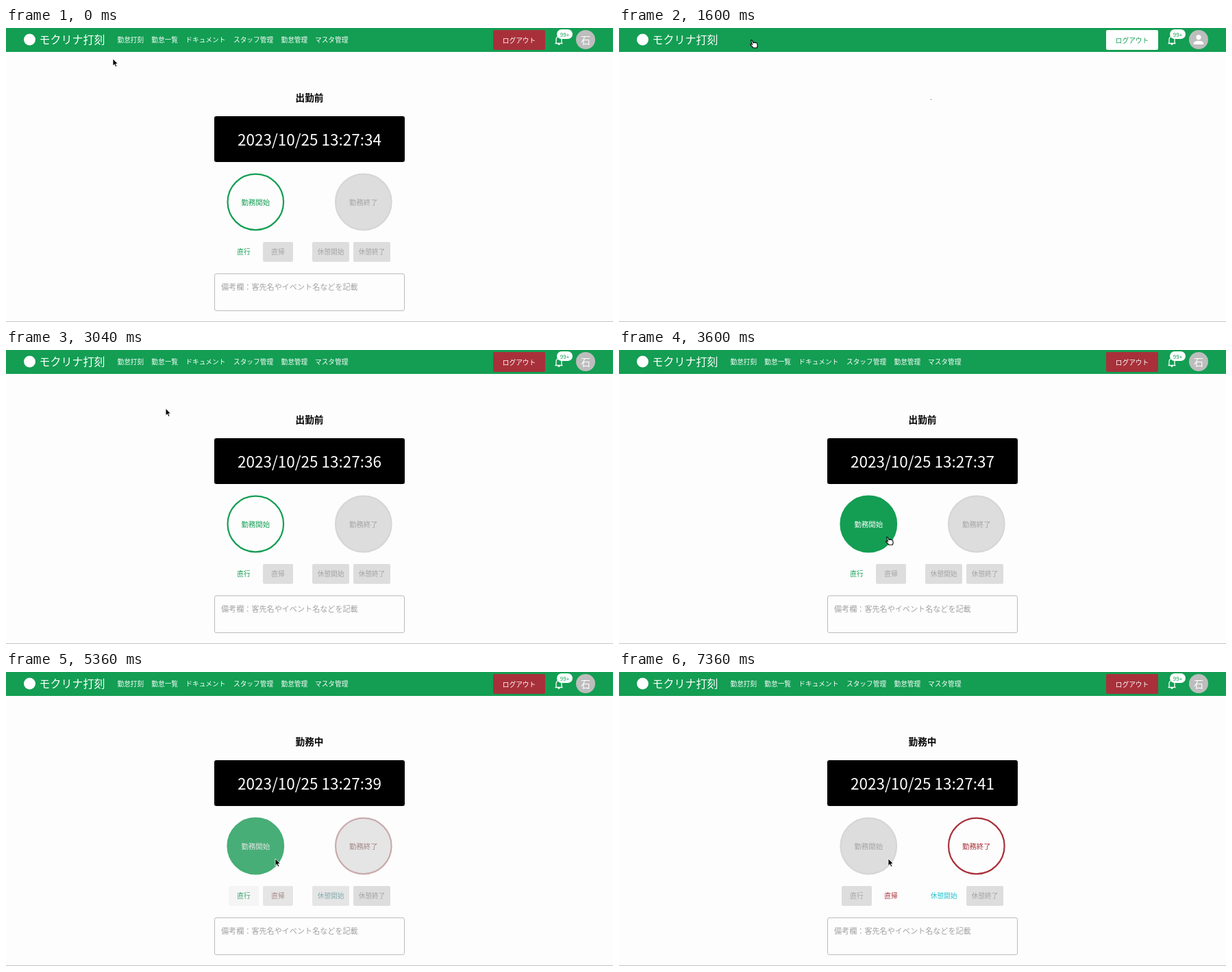
These frames come from a looping animation (886 px wide and 430 px high, 7.6 s). An HTML page:

```html
<!DOCTYPE html>
<html lang="ja">
<head>
<meta charset="utf-8">
<title>打刻画面</title>
<style>
html, body { margin: 0; width: 100%; height: 100%; overflow: hidden; background: #fdfdfd; }
svg { display: block; font: 500 9.7px "Noto Sans CJK JP", "Noto Sans CJK", sans-serif; }
.mid { text-anchor: middle; }
</style>
</head>
<body>
<svg width="886" height="430" viewBox="0 0 886 430">
  <rect width="886" height="35" fill="#139e53"/>
  <rect y="429" width="886" height="1" fill="#c4c4c4"/>
  <circle cx="34.5" cy="17" r="8.5" fill="#fff"/>
  <text x="48.5" y="23" font-size="16" fill="#fff">モクリナ打刻</text>
  <g id="nav" fill="#fff"></g>
  <rect id="logoutBox" x="711" y="3" width="76" height="29" rx="2"/>
  <text id="logout" class="mid" x="749" y="21.5">ログアウト</text>
  <path d="M801.5 22.5h11M803 22v-5q0-4 4-4.3q4 .3 4 4.300v5M805.700 24h2.600" fill="none" stroke="#fff" stroke-width="1.300"/>
  <rect x="804" y="2" width="23" height="14" rx="7" fill="#fff"/>
  <text class="mid" x="815.5" y="12.500" font-size="8" font-weight="400" fill="#139e53">99+</text>
  <circle cx="846" cy="17" r="14" fill="#bdbdbd"/>
  <text id="initial" class="mid" x="846" y="22.500" font-size="14" font-weight="400" fill="#fff">石</text>
  <path id="person" fill="#fff" d="M846 10a3.600 3.600 0 0 1 0 7.200a3.600 3.600 0 0 1 0-7.200M838.800 24v-1.800q0-3.300 7.200-3.500q7.200.2 7.200 3.500V24z"/>
  <g id="form">
    <text id="status" class="mid" x="443" y="107" font-size="13.6" font-weight="700"></text>
    <rect x="304" y="129" width="278" height="67" rx="3"/>
    <text id="clock" class="mid" x="443" y="172" font-size="22.5" font-weight="400" fill="#fff"></text>
    <g id="buttons"></g>
    <rect x="304.500" y="359.500" width="277" height="54" rx="2.500" fill="none" stroke="#bcbcbc"/>
    <text x="314" y="383" font-size="11.1" font-weight="400" fill="#a2a2a2">備考欄：客先名やイベント名などを記載</text>
  </g>
  <circle id="spinner" cx="443.3" cy="104.300" r="12.3" fill="none" stroke="#139e53" stroke-width="2.200" pathLength="126.920"/>
  <g id="cursor">
    <path id="arrow" d="M0 0V10.300L2.400 8.200L4 11.900L5.800 11.100L4.200 7.500H7.300Z" stroke="#fff" stroke-width=".8"/>
    <path id="hand" d="M-2.500 1.200Q-2 0-.8 1L1 4.600Q1.800 3.500 2.800 4.500Q3.800 3.700 4.700 4.800Q6.200 4.300 6.700 6L7.200 9L6.300 12H1L-3.300 7.500Q-3.300 6-1.500 6.600L-.6 7.200Z" fill="#fff" stroke="#000" stroke-width="1.100"/>
  </g>
</svg>
<script>
const LOOP = 7600, STEP = 80;
const GREEN = [19, 158, 83], RED = [168, 48, 58], CYAN = [34, 195, 205];
const PAPER = [253, 253, 253], WHITE = [255, 255, 255];
const GREY = [221, 221, 221], RIM = [214, 214, 214], FAINT = [164, 164, 164];
const TICKS = [960, 2400, 3120, 4000, 5040, 6000, 7040];
const LEAVE = 1440, SPIN = 1600, LOGIN = 1760, LOADED = 2400, HOVER = 3270, STARTED = 5295;

const $ = id => document.getElementById(id);
const clamp = v => Math.max(0, Math.min(1, v));
const span = (t, from, to) => clamp((t - from) / (to - from));
const show = (id, on) => $(id).setAttribute('visibility', on ? 'inherit' : 'hidden');
const mix = (a, b, p) => a.map((v, i) => v + (b[i] - v) * p);
const rgb = c => `rgb(${c.map(Math.round)})`;

// CSS cubic-bezier(x1, 0, x2, 1)
function bezier(x, x1, x2) {
  let lo = 0, hi = 1, u = .5;
  for (let i = 0; i < 24; i++) {
    u = (lo + hi) / 2;
    if (3 * u * (1 - u) ** 2 * x1 + 3 * u * u * (1 - u) * x2 + u ** 3 < x) lo = u; else hi = u;
  }
  return u * u * (3 - 2 * u);
}
const fade = (t, start) => bezier(span(t, start, start + 250), .4, .2);
const inOutCubic = s => s < .5 ? 4 * s ** 3 : 1 - 4 * (1 - s) ** 3;

function add(parent, tag, attrs, text = '') {
  const el = document.createElementNS('http://www.w3.org/2000/svg', tag);
  for (const key in attrs) el.setAttribute(key, attrs[key]);
  el.textContent = text;
  return $(parent).appendChild(el);
}

[['勤怠打刻', 162.5], ['勤怠一覧', 212.3], ['ドキュメント', 262.3],
 ['スタッフ管理', 332], ['勤怠管理', 401.5], ['マスタ管理', 451]]
  .forEach(([label, x]) => add('nav', 'text', { x, y: 21 }, label));

function button(label, x, y, tag, attrs, size) {
  const box = add('buttons', tag, attrs);
  const text = add('buttons', 'text', { x, y, class: 'mid', 'font-size': size }, label);
  return (fill, stroke, color) => {
    box.setAttribute('fill', rgb(fill));
    box.setAttribute('stroke', rgb(stroke));
    text.setAttribute('fill', rgb(color));
  };
}
const round = (label, cx) =>
  button(label, cx, 258.7, 'circle', { cx, cy: 254.5, r: 40.8, 'stroke-width': 2.2 }, 10.4);
const small = (label, x, width) =>
  button(label, x + width / 2, 331.3, 'rect', { x, y: 313, width, height: 29, rx: 2, 'stroke-width': 0 }, 9.7);

const start = round('勤務開始', 364.3), finish = round('勤務終了', 521.8);
const direct = small('直行', 325, 44), home = small('直帰', 375, 44);
const rest = small('休憩開始', 447, 54), resume = small('休憩終了', 507, 54);

function drawButtons(t) {
  const hover = fade(t, HOVER), done = fade(t, STARTED);
  start(mix(mix(PAPER, GREEN, hover), GREY, done), mix(GREEN, RIM, done),
    mix(mix(GREEN, WHITE, hover), FAINT, done));
  finish(mix(GREY, PAPER, done), mix(RIM, RED, done), mix(FAINT, RED, done));
  direct(mix(PAPER, GREY, done), PAPER, mix(GREEN, FAINT, done));
  home(mix(GREY, PAPER, done), PAPER, mix(FAINT, RED, done));
  rest(mix(GREY, PAPER, done), PAPER, mix(FAINT, CYAN, done));
  resume(GREY, PAPER, FAINT);
}

function drawSpinner(t) {
  const turn = ((t - SPIN) / 1400) % 1;
  const grow = bezier(clamp(turn * 2), .42, .58), shrink = bezier(clamp(turn * 2 - 1), .42, .58);
  $('spinner').setAttribute('stroke-dasharray', `${1 + 99 * grow} 200`);
  $('spinner').setAttribute('stroke-dashoffset', -15 * grow - 110 * shrink);
  $('spinner').setAttribute('transform', `rotate(${turn * 360} 443.3 104.3)`);
}

function drawCursor(t) {
  const up = inOutCubic(span(t, 0, 400)), down = inOutCubic(span(t, 2720, 3600));
  const x = 156 + 39 * up + 198 * down;
  const y = 45 - 28 * up + 256 * down ** .8;
  const hand = t >= 560 && y < 28 || t >= HOVER && t < STARTED;
  $('cursor').setAttribute('transform', `translate(${x} ${y})`);
  show('hand', hand);
  show('arrow', !hand);
}

function draw(t) {
  const member = t < LEAVE || t >= LOGIN;
  show('nav', member);
  show('initial', member);
  show('person', !member);
  $('logoutBox').setAttribute('fill', rgb(member ? RED : WHITE));
  $('logout').setAttribute('fill', rgb(member ? WHITE : GREEN));
  show('form', t < LEAVE || t >= LOADED);
  show('spinner', t >= SPIN && t < LOADED);
  $('status').textContent = t < STARTED ? '出勤前' : '勤務中';
  $('clock').textContent = `2023/10/25 13:27:${34 + TICKS.filter(tick => t >= tick).length}`;
  drawButtons(t);
  drawSpinner(Math.max(t, SPIN));
  drawCursor(t);
}

const begin = performance.now();
function loop() {
  const t = (performance.now() - begin) % LOOP;
  draw(Math.floor(t / STEP) * STEP);
  requestAnimationFrame(loop);
}
loop();
</script>
</body>
</html>
```
